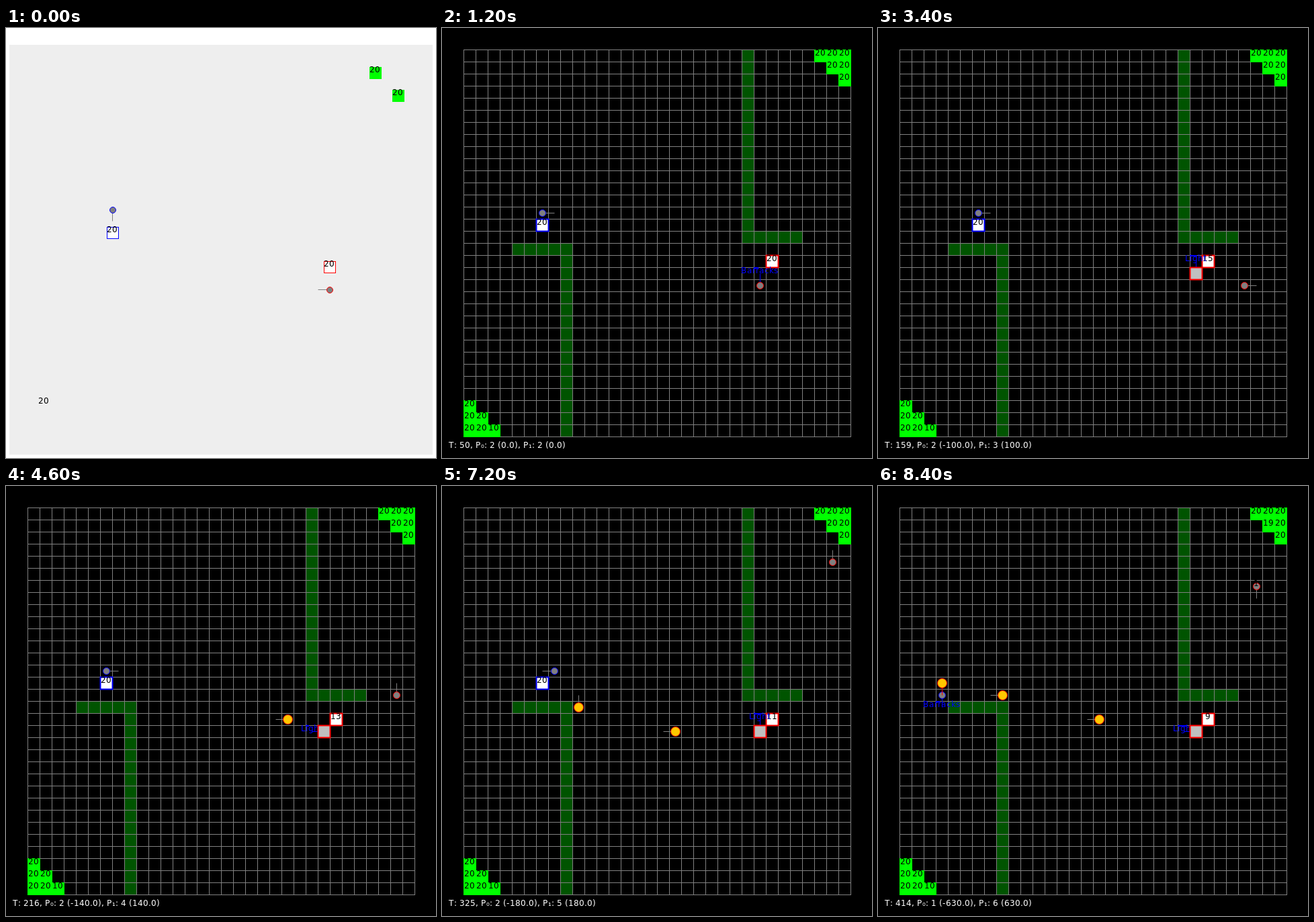
These frames come from a looping animation (640x640 px, 8.5 s). An HTML page with a canvas:

```html
<!DOCTYPE html>
<html lang="en">
<head>
<meta charset="utf-8">
<style>
html, body { margin: 0; width: 100%; height: 100%; overflow: hidden; background: #000; }
canvas { display: block; }
</style>
</head>
<body>
<canvas id="stage" width="640" height="640"></canvas>
<script>
const ctx = document.getElementById('stage').getContext('2d');
const FRAME_MS = 100, FRAMES = 85;
const BLUE = '#00f', RED = '#f00', GRAY = '#808080', GREEN = '#0f0', ORANGE = '#ffc800';
const DIRECTIONS = { L: [-1, 0], R: [1, 0], U: [0, -1], D: [0, 1] };

// [frame, game tick] pairs; ticks run evenly in between.
const CLOCK = [[1, 1], [24, 104], [27, 118], [36, 171], [46, 216], [54, 249],
  [60, 285], [63, 302], [72, 325], [81, 403], [84, 414]];

const RESOURCES = [[29, 0], [30, 0], [31, 0], [30, 1], [31, 1], [31, 2],
  [0, 29], [0, 30], [1, 30], [0, 31], [1, 31], [2, 31]];

// One letter per step: capitals move, small letters act on a neighbour, a dot waits.
const BLUE_WORKER = 'D' + 'RL'.repeat(16) + 'LLLDD.';
const RED_WORKER = 'L' + '.'.repeat(10) + 'R'.repeat(6) + 'U'.repeat(17) + 'uuDDDLDD';
const LIGHT_RAID = 'L'.repeat(15) + 'UULLUl';
const LIGHT_CHASE = 'LLLLd';
const LIGHT_SECOND = 'L'.repeat(14) + 'UUULL';
const LIGHT_THIRD = 'L'.repeat(20);

let cell, originX, originY;
const px = col => originX + col * cell;
const py = row => originY + row * cell;
const half = () => Math.floor(cell / 2);

function setGrid(size, x, y) {
  cell = size;
  originX = x;
  originY = y;
}

function fill(color, x, y, w, h) {
  ctx.fillStyle = color;
  ctx.fillRect(x, y, w, h);
}

// Letters advance by whole pixels.
const advance = char => Math.round(ctx.measureText(char).width + 0.3);

function write(text, x, y, color) {
  ctx.fillStyle = color;
  for (const char of text) {
    ctx.fillText(char, x, y);
    x += advance(char);
  }
}

function label(text, col, row, color = '#000') {
  const width = [...text].reduce((sum, char) => sum + advance(char), 0);
  write(text, px(col) + half() - Math.floor(width / 2), py(row) + half(), color);
}

function actionLine(col, row, direction, color) {
  const [dx, dy] = DIRECTIONS[direction];
  const x = px(col) + half() + 0.5, y = py(row) + half() + 0.5;
  ctx.strokeStyle = color;
  ctx.lineWidth = 1;
  ctx.beginPath();
  ctx.moveTo(x, y);
  ctx.lineTo(x + dx * cell, y + dy * cell);
  ctx.stroke();
}

function resource(col, row, amount) {
  fill(GREEN, px(col), py(row), cell + 1, cell + 1);
  label(amount, col, row);
}

function building(col, row, color, owner, text = '', lineWidth = 2) {
  fill(color, px(col), py(row), cell, cell);
  ctx.strokeStyle = owner;
  ctx.lineWidth = lineWidth;
  ctx.strokeRect(px(col) + 0.5, py(row) + 0.5, cell, cell);
  label(text, col, row);
}

function disc(col, row, inset, color, owner) {
  const radius = cell / 2 - inset;
  ctx.beginPath();
  ctx.arc(px(col) + cell / 2 + 0.5, py(row) + cell / 2 + 0.5, radius, 0, 2 * Math.PI);
  ctx.fillStyle = color;
  ctx.fill();
  ctx.strokeStyle = owner;
  ctx.lineWidth = 1;
  ctx.stroke();
}

function walk(path, col, row, elapsed, stepTicks) {
  const index = Math.min(Math.floor(elapsed / stepTicks), path.length - 1);
  for (const step of path.slice(0, index)) {
    const [dx, dy] = DIRECTIONS[step] || [0, 0];
    col += dx;
    row += dy;
  }
  return { col, row, action: path[index] };
}

function unit({ col, row, action }, inset, color, owner) {
  const direction = action.toUpperCase();
  if (action !== '.') actionLine(col, row, direction, action === direction ? GRAY : RED);
  disc(col, row, inset, color, owner);
}

function produce(name, col, row, direction, progress) {
  const [dx, dy] = DIRECTIONS[direction];
  actionLine(col, row, direction, BLUE);
  label(name, col + dx, row + dy, BLUE);
  fill(BLUE, px(col + dx), py(row + dy), Math.floor(cell * progress), 2);
}

function drawOpening() {
  setGrid(17, 48, 58);
  fill('#fff', 0, 0, 640, 640);
  fill('#eee', 5, 25, 630, 610);
  resource(29, 0, '20');
  resource(31, 2, '20');
  label('20', 0, 29);
  building(6, 14, '#fff', BLUE, '20', 1);
  building(25, 17, '#fff', RED, '20', 1);
  unit({ col: 6, row: 12, action: 'D' }, 4, GRAY, BLUE);
  unit({ col: 25, row: 19, action: 'L' }, 4, GRAY, RED);
}

function drawMap(tick) {
  fill('#000', 0, 0, 640, 640);
  const wall = (col, row, cols, rows) =>
    fill('#005400', px(col), py(row), cols * cell, rows * cell);
  wall(23, 0, 1, 16);
  wall(23, 15, 5, 1);
  wall(4, 16, 5, 1);
  wall(8, 16, 1, 16);
  for (let i = 0; i <= 32; i++) {
    fill(GRAY, px(i), py(0), 1, 32 * cell + 1);
    fill(GRAY, px(0), py(i), 32 * cell + 1, 1);
  }
  for (const [col, row] of RESOURCES) {
    const mined = col === 30 && row === 1 && tick >= 360;
    resource(col, row, col === 2 ? '10' : mined ? '19' : '20');
  }
}

function drawUnits(tick, stock) {
  if (tick < 380) building(6, 14, '#fff', BLUE, '20');
  building(25, 17, '#fff', RED, String(stock));

  const blueWorker = walk(BLUE_WORKER, 6, 12, tick, 10);
  if (tick >= 380) produce('Barracks', blueWorker.col, blueWorker.row, 'D', (tick - 380) / 100);
  unit(blueWorker, 4, GRAY, BLUE);

  const redWorker = walk(RED_WORKER, 25, 19, tick, 10);
  if (tick >= 10 && tick < 110) produce('Barracks', 24, 19, 'U', (tick - 10) / 100);
  unit(redWorker, 4, GRAY, RED);
  if (tick >= 360) label('1', redWorker.col, redWorker.row);

  if (tick >= 110) {
    const batch = Math.floor((tick - 110) / 80);
    produce('Light', 24, 18, batch % 2 ? 'L' : 'U', (tick - 110) % 80 / 80);
    building(24, 18, '#c0c0c0', RED);
  }

  const light = state => unit(state, 2, ORANGE, RED);
  if (tick >= 380) light(walk(LIGHT_CHASE, 7, 14, tick - 380, 8));
  else if (tick >= 190) light(walk(LIGHT_RAID, 24, 17, tick - 190, 8));
  if (tick >= 270) light(walk(LIGHT_SECOND, 23, 18, tick - 270, 8));
  if (tick >= 350) light(walk(LIGHT_THIRD, 24, 17, tick - 350, 8));
}

function drawGame(tick) {
  setGrid(18, 32, 32);
  const lights = Math.max(0, Math.min(3, Math.floor((tick - 110) / 80)));
  const built = tick >= 110 ? 1 : 0;
  const baseLost = tick >= 380;
  const score = built * 100 + lights * 40 + (tick >= 360 ? 10 : 0) + (baseLost ? 400 : 0);

  drawMap(tick);
  drawUnits(tick, 20 - built * 5 - lights * 2);
  const blueScore = (score ? '-' : '') + score.toFixed(1);
  write(`T: ${tick}, P₀: ${baseLost ? 1 : 2} (${blueScore}), ` +
    `P₁: ${2 + built + lights} (${score.toFixed(1)})`, 10, 625, '#fff');
}

function tickAt(frame) {
  const next = Math.max(1, CLOCK.findIndex(([end]) => frame <= end));
  const [startFrame, startTick] = CLOCK[next - 1];
  const [endFrame, endTick] = CLOCK[next];
  const part = (frame - startFrame) / (endFrame - startFrame);
  return Math.round(startTick + part * (endTick - startTick));
}

const startTime = performance.now();

function render() {
  const elapsed = Math.max(0, performance.now() - startTime);
  const frame = Math.floor(elapsed / FRAME_MS) % FRAMES;
  ctx.font = '12px "DejaVu Sans", sans-serif';
  if (frame === 0) drawOpening();
  else drawGame(tickAt(frame));
  requestAnimationFrame(render);
}

render();
</script>
</body>
</html>
```
